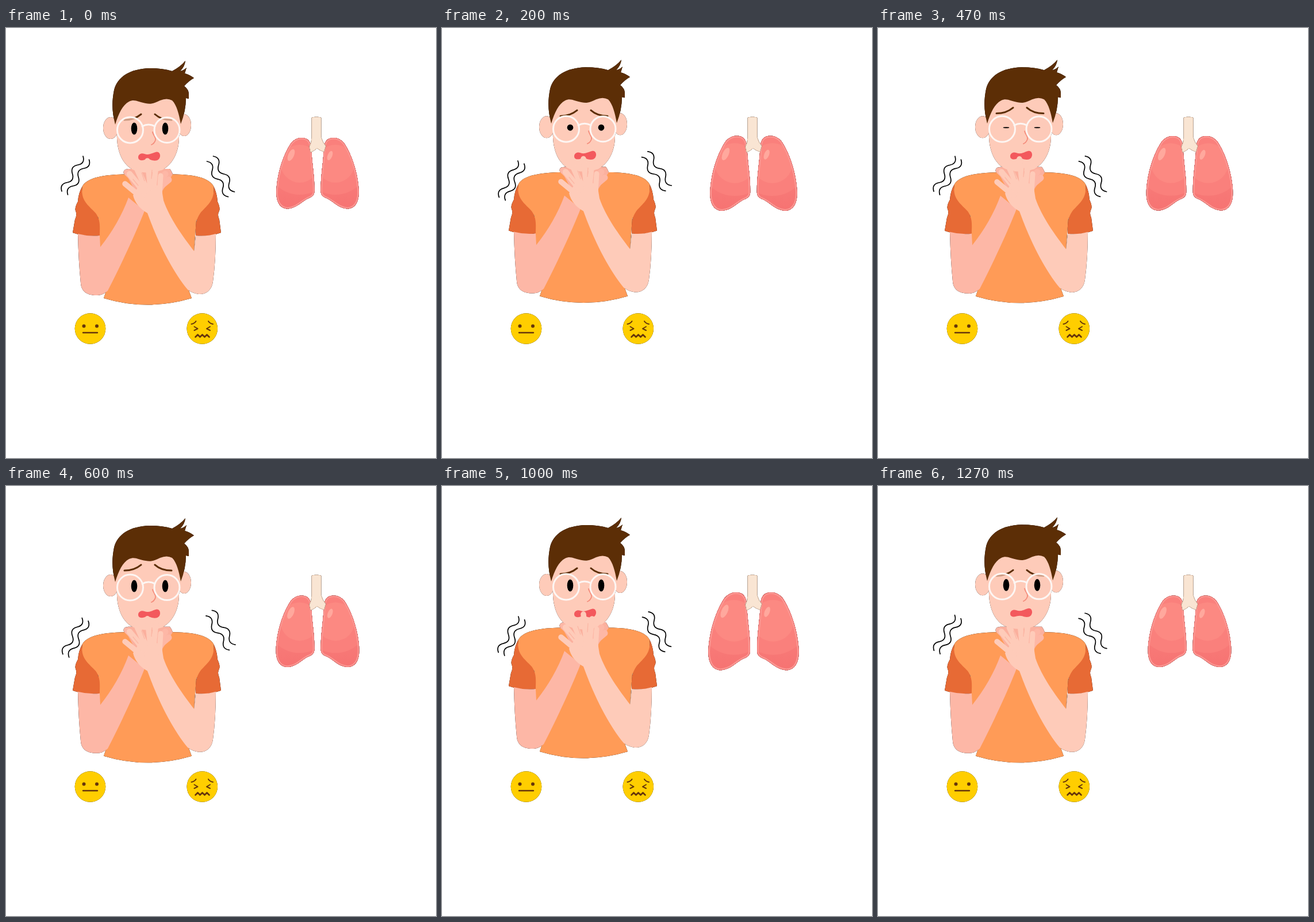
These frames come from a looping animation (748 by 748 pixels, 1.34 s). An HTML page:

```html
<!DOCTYPE html>
<html lang="en">
<head>
<meta charset="utf-8">
<title>Shortness of breath</title>
<style>
  html, body { margin: 0; width: 100%; height: 100%; overflow: hidden; background: #fff; }
  svg { display: block; width: 100vw; height: 100vh; }
  .edge { filter: drop-shadow(0 0 .5px #000); }
  .line { fill: none; stroke-linecap: round; stroke-linejoin: round; }
  .light { fill: #fecbb9; }
  .dark { fill: #fdb7a6; }
  .brown { stroke: #5c2e06; }
</style>
</head>
<body>
<svg viewBox="0 0 748 748">
  <defs>
    <path id="lobe" d="M514 191C525 191 530 197 531 209C532 235 537 258 536.500 285Q536 292 529 295C515 300 508 313 490 314.500C474 314 469 298 470.500 279C473 246 485 216 496 200Q504 191 514 191Z"/>
    <clipPath id="lobeClip"><use href="#lobe"/></clipPath>
    <linearGradient id="flesh" x1="0" y1="0" x2="0" y2="1">
      <stop offset="0" stop-color="#fb8883"/>
      <stop offset="1" stop-color="#f67372"/>
    </linearGradient>
    <g id="lung">
      <use href="#lobe" fill="url(#flesh)"/>
      <g clip-path="url(#lobeClip)">
        <circle cx="511" cy="232" r="58" fill="#fa807c"/>
        <circle cx="511" cy="236" r="33" fill="#fc8982"/>
        <use href="#lobe" fill="none" stroke="#fb9a95" stroke-width="5"/>
        <use href="#lobe" fill="none" stroke="#f1716f" stroke-width="1.500"/>
      </g>
    </g>
  </defs>

  <g class="edge">
    <g data-body>
      <path fill="#fbb09e" d="M212 245H285Q294 257 288 264L268 290H228L204 262Q205 252 212 245Z"/>
    </g>

    <g id="head">
      <g class="light">
        <ellipse cx="182" cy="174" rx="13" ry="19"/>
        <ellipse cx="310" cy="169" rx="12" ry="19"/>
        <path d="M190 118L193 192C194 216 203 238 222 247Q246 256 272 247C293 235 301 212 301 190L304 118Z"/>
      </g>
      <path fill="#5c2e06" d="M190 168C184 145 184 128 188 108C194 85 215 71 250 70Q272 70 289 75Q304 67 312 57Q311 67 303 75Q309 74 314 69L311 79Q319 81 327 87Q318 92 310 101Q318 107 318 115V123L313 122Q313 144 304 167C301 150 297 134 289 126Q280 121 268 126C258 131 252 133 243 131C230 129 224 123 214 128C203 134 196 148 190 168Z"/>
      <g id="brows" class="line brown" stroke-width="3">
        <path d="M206 160Q223 160 235 150M259 150Q270 160 288 160"/>
      </g>
      <g class="light" opacity=".7">
        <circle cx="216" cy="177.500" r="22"/>
        <circle cx="280" cy="177.500" r="22"/>
      </g>
      <ellipse class="eye" cx="223" cy="175" rx="5.300" ry="10.500"/>
      <ellipse class="eye" cx="277" cy="175" rx="5.300" ry="10.500"/>
      <path class="line" stroke="#f48d7c" stroke-width="1.800" d="M255 181C256 187 261 189 260 195Q258 201 253 203"/>
      <path fill="#f3595d" d="M230 225C230 219 236 217 241 219C249 222 255 217 262 215.500C268 215 270 223 266 228C262 232 256 231 251 229C244 227 239 231 234 230Q230 229 230 225Z"/>
      <g class="line" stroke="#fdf6f3" stroke-width="3">
        <circle cx="216" cy="177.500" r="22.500"/>
        <circle cx="280" cy="177.500" r="22"/>
        <path d="M237 171Q248 165 259 171"/>
      </g>
    </g>

    <g data-body>
      <path fill="#ff9b57" d="M209 254.500C185 254.500 143 257 133 275L130 300L161 330V385L180 440L170 470Q246 493 323 470L312 440L327 388L331 335L362 300L361 275C351 257 314 254.500 290 254.500L268 290H228Z"/>
      <path fill="#e76a35" d="M133 275Q126 287 125 302Q119 313 121 318Q124 325 120 333L116 356Q138 364 163 361C163 345 165 335 156 322C143 308 129 300 133 275ZM361 275Q367 287 368 302Q373 313 371 318Q367 325 371 333L374 356Q352 364 330 361C330 345 329 335 338 322C350 308 364 300 361 275Z"/>
      <path class="dark" d="M125 358Q144 363 163 361L164 381C185 355 202 325 213 295L241 318C228 352 198 417 177 457Q167 466 157 465C142 465 131 459 130 444Q126 405 125 358Z"/>
      <g class="line" stroke="#fdb7a6" stroke-width="11">
        <path d="M283 264L252 290M277 254L250 282M210 251L232 272"/>
      </g>
      <path class="light" d="M330 361Q348 363 365 358Q365 405 360 441C358 457 347 464 335 463Q323 461 316 455C291 425 265 375 246 322Q226 311 221 291L235 268L270 275L274 300C285 332 308 363 327 388Z"/>
      <g class="line" stroke="#fecbb9">
        <path stroke-width="9.500" d="M207 271L236 295"/>
        <path stroke-width="10.500" d="M215 254L240 285M229 247L244 280"/>
        <path stroke-width="9.500" d="M246 231L251 278M261 239L257 275"/>
        <path stroke-width="9" d="M269 257L267 290"/>
      </g>
      <path class="line" stroke="#fbb5a3" stroke-width="1.200" d="M221 263L230 274M236 252L241 266M254 247L253 262"/>
    </g>
  </g>

  <g id="shake" class="line" stroke="#000" stroke-width="1.700">
    <path d="M134 223q3.900 12.800-9.250 15.250t-9.250 15.250t-9.250 15.250t-9.250 15.250M144.500 229q3.900 12.800-9.250 15.250t-9.250 15.250t-9.250 15.250t-9.250 15.250"/>
    <path d="M360.500 223q13.200 2.700 9.250 15.500t9.250 15.500t9.250 15.500t9.250 15.500M349.500 232q13.200 2.700 9.250 15.400t9.250 15.400t9.250 15.400t9.250 15.400"/>
  </g>

  <g id="lungs" class="edge">
    <use href="#lung"/>
    <use href="#lung" transform="translate(1084 0) scale(-1 1)"/>
    <g fill="#ffa89d">
      <ellipse cx="496" cy="221" rx="5" ry="11" transform="rotate(24 496 221)"/>
      <ellipse cx="563.500" cy="222" rx="4" ry="8.500" transform="rotate(22 563.500 222)"/>
    </g>
  </g>
  <path class="edge" fill="#f9e5d3" stroke="#f3d3bb" d="M532 156Q540 153.500 548 156V190Q551 200 556 205L553 215Q546 213 541 209Q537 213 530 216L528 206Q532 200 532 190Z"/>

  <g class="edge" fill="#ffce00">
    <circle cx="146.500" cy="523" r="26.800"/>
    <circle cx="341.300" cy="523" r="26.800"/>
  </g>
  <g fill="#66360b">
    <circle cx="135.500" cy="518.500" r="3"/>
    <circle cx="158" cy="518.500" r="3"/>
  </g>
  <g class="line" stroke="#66360b" stroke-width="2.400">
    <path d="M134 530H159"/>
    <path stroke-width="2" d="M322.500 515Q328 514 330.500 510M352 510Q354.500 514 360 515M327.500 519.500L333.500 523L327.500 526M355 519.500L349 523L355 526"/>
    <path stroke-width="2.600" d="M329.500 537.500l4-4 4 4 4-4 4 4 4-4 4 4"/>
  </g>
</svg>
<script>
  const LOOP = 1340, STEPS = 20, STEP = 200 / 3;

  const all = s => document.querySelectorAll(s);
  const [head, brows, shake, lungs] = ['head', 'brows', 'shake', 'lungs'].map(id => document.getElementById(id));
  const bodies = all('[data-body]'), eyes = all('.eye');

  // Pairs of step and value, joined by straight lines.
  const track = (...keys) => s => {
    const i = Math.max(1, keys.findIndex(k => k[0] >= s));
    const [a, u] = keys[i - 1], [b, v] = keys[i];
    return u + (v - u) * (s - a) / (b - a);
  };

  const rise = track([0, 0], [1, .4], [2, 2], [3, 3.6], [5, 8], [7, 3.2], [8, 1.5], [9, .3], [10, 0]);
  const swell = track([0, 0], [1, 1], [2, 3], [3, 4], [5, 7], [7, 3.6], [9, .7], [10, 0]);
  const nod = track([0, 0], [3, 1.8], [5, 2.7], [7, 1.7], [9, .9], [11, .3], [12, .6], [15, 2], [17, 2.9], [20, 2.6]);
  const lift = track([0, 0], [3, 5], [7, 9.7], [9, 12], [10, 12], [12, 9.3], [15, 5], [20, 0]);
  const blink = track([0, 10.5], [3, 5.5], [6, 1.2], [7, 1], [9, 10.5], [20, 10.5]);

  const move = (el, y) => el.setAttribute('transform', `translate(0 ${y})`);

  function draw(t) {
    const s = Math.min(STEPS - 1, Math.floor((t + 4) / STEP));
    const breath = s % 10;
    bodies.forEach(el => move(el, -rise(breath)));
    move(head, -nod(s));
    move(brows, -lift(s));
    eyes.forEach(el => el.setAttribute('ry', blink(s)));
    const size = 1 + swell(breath) / 72;
    lungs.setAttribute('transform', `translate(542 253) scale(${size}) translate(-542 -253)`);
    const tilt = -2.1 * (1 - Math.cos(6 * Math.PI * s / STEPS));
    shake.setAttribute('transform', `rotate(${tilt} 245 256)`);
  }

  const start = performance.now();
  function tick(now) {
    draw(Math.max(0, now - start) % LOOP);
    requestAnimationFrame(tick);
  }
  draw(0);
  requestAnimationFrame(tick);
</script>
</body>
</html>
```
